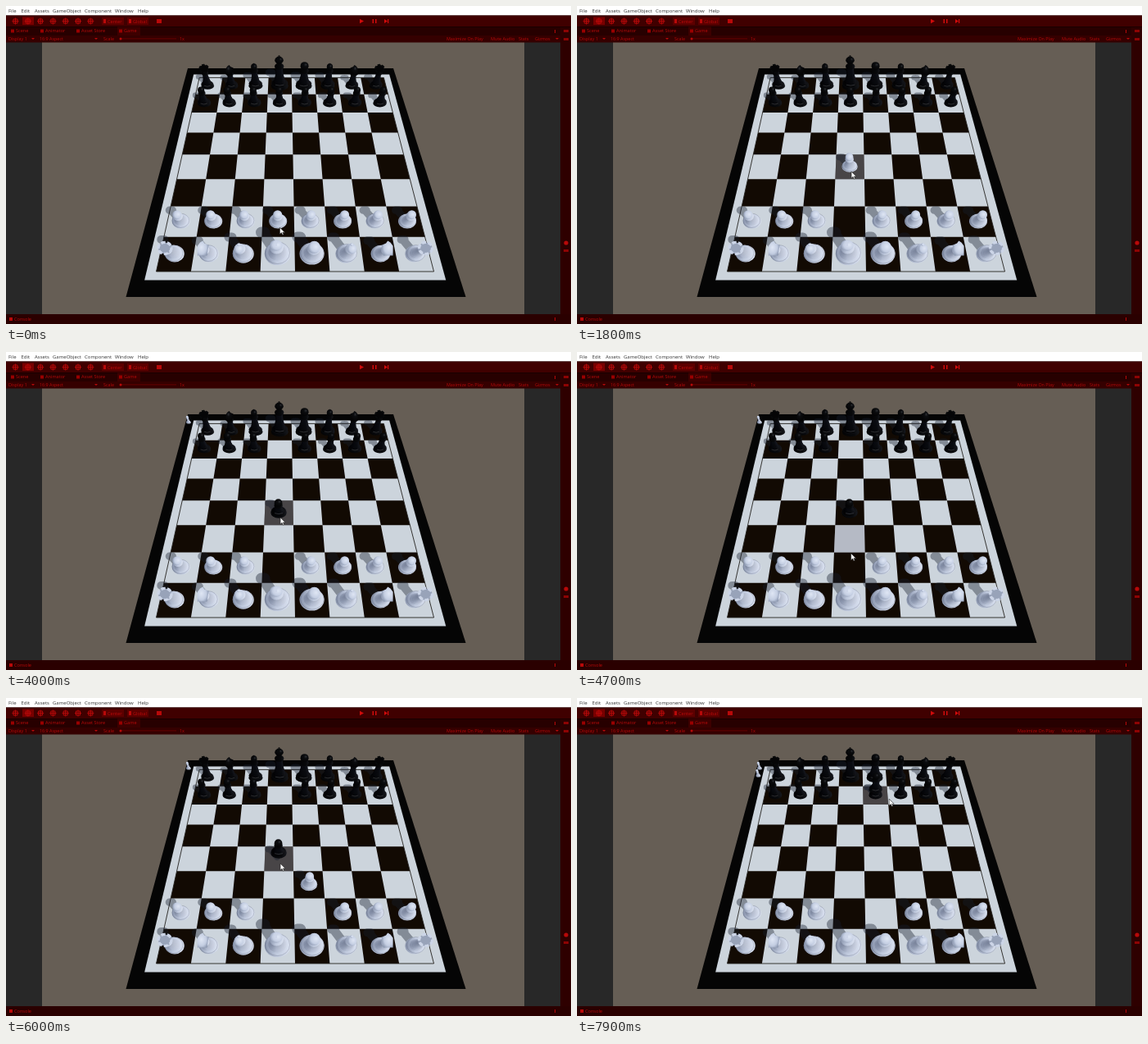
An HTML page that plays this animation: 690 by 388 pixels, repeating every 8000 ms.

```html
<!DOCTYPE html>
<html lang="en">
<head>
<meta charset="utf-8">
<title>Chess board</title>
<style>
html, body { margin: 0; width: 100%; height: 100%; overflow: hidden; background: #282828; }
svg { display: block; width: 100vw; height: 100vh; font-family: "Open Sans", "Noto Sans", sans-serif; }
</style>
</head>
<body>
<svg viewBox="0 0 690 388">
  <defs>
    <linearGradient id="white">
      <stop offset="0" stop-color="#8893ab"/><stop offset=".45" stop-color="#bfc9dd"/><stop offset="1" stop-color="#d9e0ef"/>
    </linearGradient>
    <radialGradient id="whiteHead" cx=".65" cy=".45" r=".7">
      <stop offset="0" stop-color="#dfe6f4"/><stop offset=".6" stop-color="#c4cee2"/><stop offset="1" stop-color="#8591aa"/>
    </radialGradient>
    <linearGradient id="black">
      <stop offset="0" stop-color="#030304"/><stop offset=".7" stop-color="#08090b"/><stop offset="1" stop-color="#17181c"/>
    </linearGradient>
    <radialGradient id="blackHead" cx=".65" cy=".35" r=".7">
      <stop offset="0" stop-color="#2c2e33"/><stop offset=".3" stop-color="#0b0c0e"/><stop offset="1" stop-color="#030304"/>
    </radialGradient>
  </defs>
  <rect width="690" height="388" fill="#282828"/>
  <rect x="44" y="44" width="589" height="332" fill="#665e55"/>
  <g id="board"></g>
  <path id="hover" fill="rgba(147,150,165,.42)"/>
  <g id="shadows"></g>
  <g id="movingShadows"></g>
  <g id="far"></g>
  <g id="moving"></g>
  <g id="near"></g>
  <g id="panels"></g>
  <path id="cursor" d="M0 0V8.2L2 6.4 3.3 9.2 4.6 8.6 3.4 6H6Z" fill="#fff" stroke="#222" stroke-width=".6"/>
</svg>
<script>
const LOOP = 8000, STEP = 100;
const $ = id => document.getElementById(id);
const lerp = (a, b, p) => a + (b - a) * p;

// Perspective: file and rank run from 0 to 8, fractions lie inside a square
const rankY = rank => 324 - 44.9 * rank / (1 + .0648 * rank);
const depth = y => (324 - y) / 236;
const boardX = (file, y) => lerp(lerp(183.5, 236, depth(y)), lerp(522.5, 461.5, depth(y)), file / 8);
const quad = (f0, f1, y0, y1) =>
  `M${boardX(f0, y0)} ${y0}H${boardX(f1, y0)}L${boardX(f1, y1)} ${y1}H${boardX(f0, y1)}Z`;
const square = (file, rank) => quad(file, file + 1, rankY(rank + 1), rankY(rank));
const center = (file, rank) => {
  const y = rankY(rank + .5);
  return [boardX(4 + (file - 3.5) * 1.02, y), y];
};

function drawBoard() {
  let dark = '';
  for (let rank = 0; rank < 8; rank++)
    for (let file = rank % 2; file < 8; file += 2) dark += square(file, rank);
  $('board').innerHTML = `
    <path d="M222 76H473L561.5 355H146.5Z" fill="#050505"/>
    <path d="${quad(-.28, 8.28, 83.5, 334.5)}" fill="#ccd4dc"/>
    <path d="${dark}" fill="#120a03"/>
    <path d="${quad(0, 8, rankY(8), 324)}" fill="none" stroke="#24221f" stroke-width=".9"/>`;
}

// Height and girth relative to a pawn
const kinds = {
  pawn: { h: 1, r: 1 }, rook: { h: 1.2, r: 1 }, knight: { h: 1.1, r: 1 },
  bishop: { h: 1.4, r: 1.1 }, queen: { h: 1.4, r: 1.28 }, king: { h: 1.8, r: 1.35 }
};

const ellipse = ([x, y], rx, ry, style) => `<ellipse cx="${x}" cy="${y}" rx="${rx}" ry="${ry}" ${style}/>`;

function drawHead(kind, color, [x, y], r) {
  const fill = `fill="url(#${color}Head)"`, flat = color === 'white' ? '#ccd5e7' : '#08090a';
  switch (kind) {
    case 'rook':
      return ellipse([x, y], r * .68, r * .6, `fill="${color === 'white' ? '#98a3b9' : '#050506'}" stroke="${flat}"
        stroke-width="${r * .28}" stroke-dasharray="${r * .45} ${r * .2}"`);
    case 'knight':
      return `<path transform="translate(${x} ${y}) scale(${r / 11 * (x < 345 ? -1 : 1)} ${r / 11})"
        d="M-5 8L-6 1-7-4-2-6 0-9 3-7 6-3 6 8Z" ${fill}/>`;
    case 'bishop':
      return ellipse([x, y + r * .15], r * .43, r * .48, fill) + ellipse([x, y - r * .25], r * .15, r * .15, fill);
    case 'king':
      return ellipse([x, y], r * .5, r * .42, fill) +
        `<path d="M${x} ${y + 1}v-7m-2.4 2.3h4.8" stroke="${flat}" stroke-width="1.7"/>`;
    default:
      return ellipse([x, y], r * .5, r * .5, fill);
  }
}

function drawPiece(kind, color, [x, y], lift = 0, scale = 1) {
  const { h, r } = kinds[kind];
  const radius = (8.2 + (y - 118) * .0194) * r * scale;
  const rise = (17 - (y - 118) * .06) * h * scale;
  const lean = (x - 345) * .04 * h * scale * (1 + Math.max(0, y - 280) / 25);
  const tilt = .55 + (y - 96) * .0016;
  const at = t => [x + lean * t, y - lift - rise * t];
  const fill = `fill="url(#${color})"`;
  const disc = (t, size, style) => ellipse(at(t), radius * size, radius * size * lerp(tilt, 1, t * .6), style);
  let out = disc(0, 1, fill) + disc(.1, .95, fill + ' stroke="rgba(30,36,54,.3)" stroke-width=".6"');
  for (let t = .14; t < .72; t += .06) {
    const size = .36 + .5 * (1 - t / .8) ** 2;
    out += disc(t, size, fill) + disc(t, size, `fill="rgba(24,30,50,${t * .35})"`);
  }
  out += disc(.72, .54, fill) + drawHead(kind, color, at(.95), radius);
  if (color === 'black') {
    const [bx, by] = at(.1);
    out += `<path d="M${bx - radius * .5} ${by + 2}q${radius * .5} 2 ${radius} 0" fill="none" stroke="#85898f" stroke-width=".6" opacity=".5"/>`;
  }
  return out;
}

function drawShadow(kind, [x, y]) {
  const { h, r } = kinds[kind], s = .7 + (y - 96) / 500;
  const ex = x - 12 * s * Math.sqrt(h), ey = y - 13 * s * h;
  return `<path d="M${x - 2} ${y - 2}L${ex} ${ey}m-2 0h4" fill="none" stroke="rgba(22,29,46,.4)"
    stroke-width="${9 * s * r}" stroke-linecap="round" stroke-linejoin="round"/>`;
}

// The three pawns that get played; the white ones are taken in turn
const pawns = [
  { color: 'black', home: [3, 6], drags: [[2700, 3000], [3700, 4000], [5900, 6500], [7200, LOOP]] },
  { color: 'white', home: [3, 1], drags: [[800, 1800]], taken: 4000 },
  { color: 'white', home: [4, 1], drags: [[5200, 5600]], taken: 6500 }
];

function drawArmies() {
  const back = ['rook', 'knight', 'bishop', 'king', 'queen', 'bishop', 'knight', 'rook'];
  for (const rank of [7, 6, 1, 0])
    back.forEach((officer, file) => {
      if (pawns.some(p => p.home[0] === file && p.home[1] === rank)) return;
      const kind = rank % 5 === 1 ? 'pawn' : officer, place = center(file, rank);
      $('shadows').innerHTML += drawShadow(kind, place);
      $(rank > 4 ? 'far' : 'near').innerHTML += drawPiece(kind, rank > 4 ? 'black' : 'white', place);
    });
}

function drawPanels() {
  const rect = (x, y, w, h, fill) => `<rect x="${x}" y="${y}" width="${w}" height="${h}" fill="${fill}"/>`;
  const labels = (places, y, size, fill) => Object.entries(places).map(([text, x]) =>
    `<text x="${x}" y="${y}" font-size="${size}" fill="${fill}">${text}</text>`).join('');
  const red = '#b80909';
  let out = rect(0, 0, 690, 11.5, '#fff') + rect(0, 11.5, 690, 14, '#400000') +
    rect(0, 25, 690, 11, '#270000') + rect(0, 36, 690, 8.5, '#350000') +
    rect(677, 25, 13, 363, '#2e0000') + rect(0, 376, 690, 12, '#2a0000') +
    rect(0, 25, 690, .8, '#160000') + rect(136, 25.5, 28, 10.5, '#3d0000');
  out += labels({ File: 3, Edit: 18.5, Assets: 35, GameObject: 57, Component: 96, Window: 133, Help: 161 }, 8.3, 6, '#333');
  out += rect(20, 13.5, 14, 9.5, '#780000') + rect(117, 14, 27, 9, '#5c0000') + rect(148, 14, 26, 9, '#5c0000');
  for (let x = 11.5; x < 110; x += 15.3)
    out += `<path d="M${x - 2.5} 16h5v5h-5Zm2.5-1.5v8m-4-4h8" fill="none" stroke="${red}"/>`;
  out += rect(119, 16, 3, 5, red) + rect(150, 16, 3, 5, red) + rect(184, 16, 6, 5, red);
  out += labels({ Center: 124, Global: 155 }, 20.6, 5.6, red);
  out += `<path d="M432 15.7l5 2.8-5 2.8ZM447.5 16h1.5v5h-1.5Zm3.5 0h1.5v5h-1.5ZM462 16l4 2.5-4 2.5Zm4 0h1.2v5h-1.2Z" fill="#d00b0b"/>`;
  const tabs = { Scene: 12, Animator: 48, 'Asset Store': 92, Game: 144 };
  for (const x of Object.values(tabs)) out += rect(x - 6, 28.5, 4, 4, '#9a0000');
  out += labels(tabs, 32.4, 5.6, red);
  out += labels({ 'Display 1': 3, '16:9 Aspect': 41, Scale: 119, '1x': 212, 'Maximize On Play': 538, 'Mute Audio': 592, Stats: 626, Gizmos: 646 }, 42, 5.4, red);
  out += rect(139, 39.5, 69, .8, '#700000') + `<circle cx="140" cy="40" r="1.5" fill="${red}"/>`;
  for (const x of [31, 108, 671]) out += `<path d="M${x} 39h4l-2 2Z" fill="${red}"/>`;
  for (const y of [29, 380]) out += rect(670, y, 1, 4, red);
  for (const y of [29, 39, 297]) out += rect(681, y, 6, 3, '#8d0404');
  out += `<circle cx="684" cy="289" r="2.6" fill="${red}"/>` + rect(4, 380, 4, 4, red);
  $('panels').innerHTML = out + labels({ Console: 10 }, 384.2, 5.6, red);
}

// The pointer's tour: the square it has reached at each time
const tour = Object.entries({
  700: 'd2', 1600: 'd4', 2000: 'd4', 2300: 'd3', 2500: 'd3', 2600: 'd7', 2900: 'd5', 3100: 'd4', 3300: 'd4',
  3500: 'd5', 3700: 'd5', 3900: 'd4', 4300: 'd4', 4900: 'd2', 5000: 'e2', 5200: 'e2', 5500: 'e3', 5800: 'd4',
  6100: 'd4', 6400: 'e3', 6600: 'e2', 6800: 'e2', 6900: 'e3', 7200: 'e3', 7800: 'e7', 8000: 'f7'
}).map(([time, name]) => ({ time: +time, file: 'abcdefgh'.indexOf(name[0]) + .55, rank: name[1] - .7 }));

function pointer(t) {
  const next = tour.findIndex(stop => stop.time > t);
  if (next < 1) return [tour[0].file, tour[0].rank];
  const a = tour[next - 1], b = tour[next], p = (t - a.time) / (b.time - a.time);
  return [lerp(a.file, b.file, p), lerp(a.rank, b.rank, p)];
}

// The highlighted square trails the pointer by one step
const hovered = t => pointer(t - STEP).map(Math.floor);

function pawnAt({ home, drags }, t) {
  const drag = drags.findLast(([from]) => from <= t);
  if (!drag) return { place: center(...home), lift: 0 };
  const end = drag[1];
  return { place: center(...hovered(Math.min(t, end))), lift: t < end ? 7 : 0 };
}

function render(t) {
  let tray = '', shade = '', taken = 0;
  const onBoard = [];
  for (const pawn of pawns) {
    if (t >= pawn.taken) {
      tray += drawPiece('pawn', 'white', [223 - taken * 1.5, 86 + taken * 9], 0, .38);
      taken++;
      continue;
    }
    const { place, lift } = pawnAt(pawn, t);
    shade += drawShadow('pawn', place);
    onBoard.push({ y: place[1], body: drawPiece('pawn', pawn.color, place, lift) });
  }
  onBoard.sort((a, b) => a.y - b.y);
  $('moving').innerHTML = tray + onBoard.map(p => p.body).join('');
  $('movingShadows').innerHTML = shade;
  $('hover').setAttribute('d', t < 700 ? '' : square(...hovered(t)));
  const [file, rank] = pointer(t), y = rankY(rank);
  $('cursor').setAttribute('transform', `translate(${boardX(file, y)} ${y})`);
}

drawBoard();
drawArmies();
drawPanels();
const start = performance.now();
function tick() {
  const t = (performance.now() - start) % LOOP;
  render(Math.floor(t / STEP) * STEP);
  requestAnimationFrame(tick);
}
tick();
</script>
</body>
</html>
```
